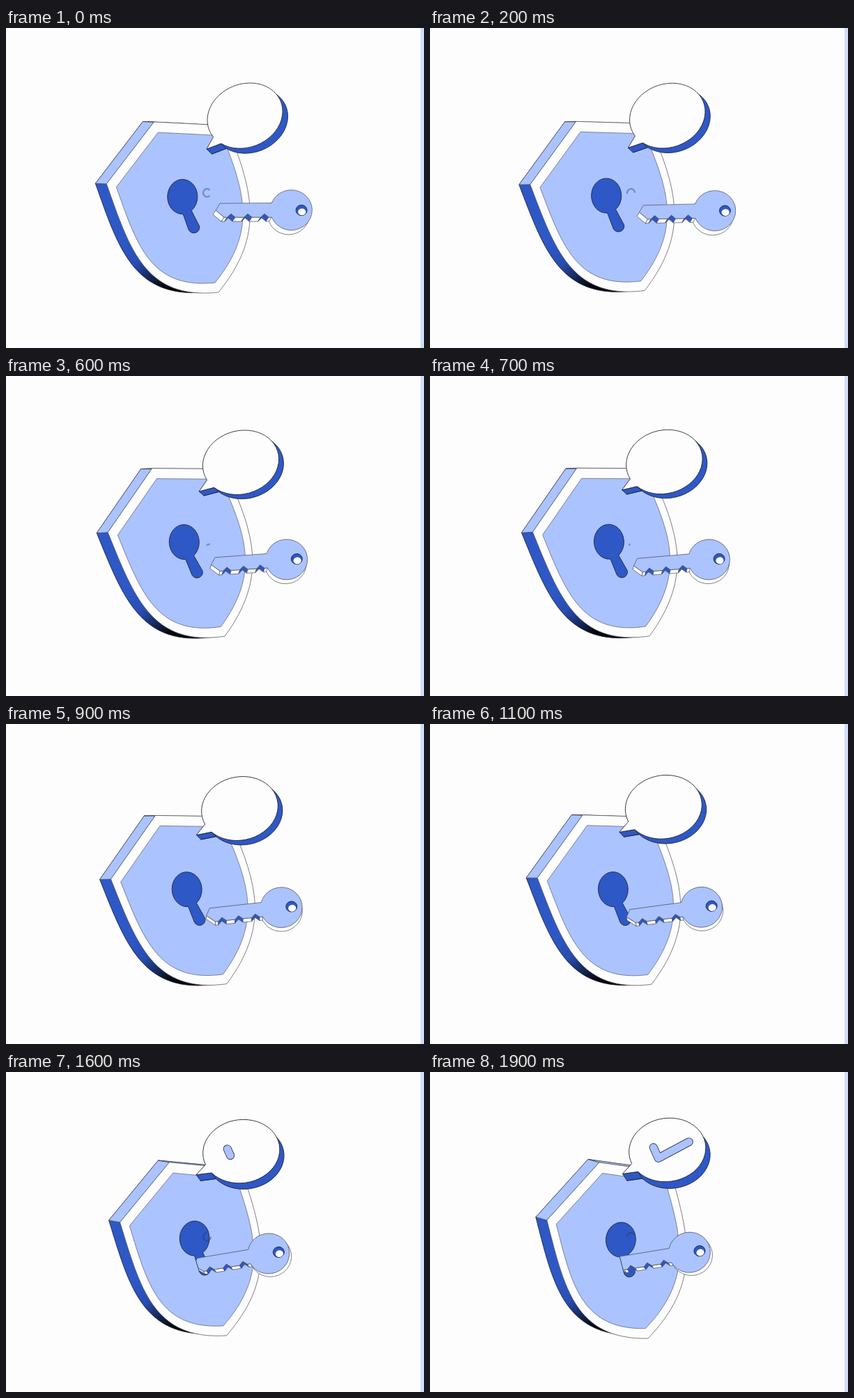
An HTML page that plays this animation: 600x460 px, repeating every 2000 ms.

```html
<!DOCTYPE html>
<html lang="en">
<head>
<meta charset="utf-8">
<title>Shield and key</title>
<style>
  html, body { margin: 0; width: 100%; height: 100%; overflow: hidden; background: #fdfdfd; }
  svg { display: block; width: 600px; height: 460px; }
  .line { stroke: #1b1d26; stroke-width: .8; stroke-linejoin: round; }
  .soft { stroke: #4a4c55; stroke-width: .7; stroke-linejoin: round; }
  .line, .soft { vector-effect: non-scaling-stroke; }
  .light { fill: #abc3ff; }
  .dark { fill: #2e58c6; }
  .white { fill: #fdfdfd; }
  .tick { fill: none; stroke-linecap: round; stroke-linejoin: round; }
</style>
</head>
<body>
<svg viewBox="0 0 600 460">
  <defs>
    <linearGradient id="shade" gradientUnits="userSpaceOnUse" x1="182" y1="314" x2="240" y2="374">
      <stop offset="0" stop-color="#2e58c6"/>
      <stop offset=".4" stop-color="#284db2"/>
      <stop offset="1" stop-color="#05070d"/>
    </linearGradient>
    <path id="plate" d="M212 135L144.5 224C178 318 200 391 305 380C372.5 296 353 233 316 140.3Z"/>
    <path id="balloon" d="M-34.2 40.1A55.3 45.5 -22 1 0 -45.4 30.6L-55 48Z"/>
    <clipPath id="slot"><path id="slotEdge" d="M173.6 40H640V440H315.8Z"/></clipPath>
  </defs>
  <rect width="600" height="460" fill="#fdfdfd"/>
  <rect x="595" width="5" height="460" fill="#cfddfb"/>

  <g id="back"><use href="#plate" fill="url(#shade)" class="line"/></g>
  <path id="bevel" class="light soft"/>
  <g id="front">
    <use href="#plate" class="white soft"/>
    <use href="#plate" class="light soft" transform="translate(31 31) scale(.882)"/>
    <path class="dark line" d="M254 267.5A21.5 25 0 1 1 266 262.5L277.5 285A8.2 8.2 0 0 1 262 290Z"/>
  </g>
  <path id="spinner" fill="none" stroke="#33384f" stroke-opacity=".42" stroke-width="2.2"/>

  <g clip-path="url(#slot)">
    <g id="key">
      <ellipse id="keyBack" rx="30" ry="29" class="white soft"/>
      <g id="teeth"></g>
      <path id="keyFace" class="light soft"/>
      <ellipse cx="14.5" cy="0" rx="8" ry="7.6" class="dark line"/>
      <ellipse cx="15.2" cy="2.4" rx="5.6" ry="4.9" class="white"/>
    </g>
  </g>

  <g id="bubble">
    <g id="bubbleBack"><use href="#balloon" class="dark line"/></g>
    <path id="tail" class="dark line"/>
    <use href="#balloon" class="white line"/>
  </g>
  <g id="check">
    <path class="tick" d="M-20 -3.5L-13 12L31 -11.5" stroke="#1b1d26" stroke-width="12"/>
    <path class="tick" d="M-20 -3.5L-13 12L31 -11.5" stroke="#abc3ff" stroke-width="10.5"/>
  </g>
</svg>
<script>
const LOOP = 2000, STEP = 100, SWAY = 4200;

const $ = id => document.getElementById(id);
const set = (id, name, value) => $(id).setAttribute(name, value);
const poly = pts => 'M' + pts.map(p => p.map(n => n.toFixed(2)).join(' ')).join('L') + 'Z';
const add = ([x, y], [dx, dy]) => [x + dx, y + dy];
const rad = deg => deg * Math.PI / 180;

// Every part floats on one slow cosine; peak is the time of its crest
const swayAt = t => (mid, amp, peak) => mid + amp * Math.cos(2 * Math.PI * (t - peak) / SWAY);

// Matrix that carries the resting top, left and tip points to the current ones
function shieldMatrix(top, left, tip) {
  const ax = -67.5, ay = 89, bx = 93, by = 245, det = ax * by - bx * ay;
  const row = i => {
    const p = left[i] - top[i], q = tip[i] - top[i];
    return [(p * by - q * ay) / det, (q * ax - p * bx) / det];
  };
  const [a, c] = row(0), [b, d] = row(1);
  return [a, b, c, d, top[0] - a * 212 - c * 135, top[1] - b * 212 - d * 135];
}

function drawShield(sway) {
  const top = [sway(229.8, -21, 400), sway(132.7, 2.9, -440)];
  const left = [sway(156.9, -13.1, 190), sway(217.8, 7.4, 380)];
  const tip = [sway(307.5, 10.6, 1210), sway(382.9, -9.4, 840)];
  const off = [-16, sway(-3, 3.9, 590)];
  const m = shieldMatrix(top, left, tip), matrix = `matrix(${m})`;
  const right = [m[0] * 316 + m[2] * 140.3 + m[4], m[1] * 316 + m[3] * 140.3 + m[5]];
  set('front', 'transform', matrix);
  set('slotEdge', 'transform', matrix);
  set('back', 'transform', `translate(${off}) ${matrix}`);
  set('bevel', 'd', poly([left, top, add(top, off), add(left, off)])
    + poly([top, right, add(right, off), add(top, off)]));
}

// Lower edge of the key: blade end, then three notches
const edge = [[-108.5, 0], [-96.5, 10]];
for (let x = -86.5; x < -38; x += 24) edge.push([x - 5.5, 10], [x, 5], [x + 6, 10]);
edge.push([-28.2, 10]);
set('keyFace', 'd', 'M-28.2 -10.5L-102.5 -10L' + edge.map(p => p.join(' ')).join('L')
  + 'A30 29 0 1 0 -28.2 -10.5Z');
const faces = edge.slice(1).map((p, i) => {
  const face = document.createElementNS('http://www.w3.org/2000/svg', 'path');
  face.setAttribute('class', (i > 0 && p[1] !== edge[i][1] ? 'dark' : 'white') + ' soft');
  $('teeth').append(face);
  return face;
});

function drawKey(sway) {
  const at = [sway(390.6, 19, 20), sway(260.2, 3.9, 730)];
  const off = [sway(-1, 3.2, 1870), sway(5.2, .8, -160)];
  set('key', 'transform', `translate(${at}) rotate(${sway(-4.2, 5, -400)})`);
  set('keyBack', 'transform', `translate(${off})`);
  faces.forEach((face, i) => {
    const a = edge[i], b = edge[i + 1];
    face.setAttribute('d', poly([a, b, add(b, off), add(a, off)]));
  });
}

function drawBubble(sway, t) {
  const at = [sway(343, -7.7, 1050), sway(118.6, 7.5, 110)];
  const turn = sway(5.8, 7.8, 1610), c = Math.cos(rad(turn)), s = Math.sin(rad(turn));
  const dx = sway(7, .8, -580), dy = sway(8.8, -2.6, 600);
  const off = [dx * c + dy * s, dy * c - dx * s];
  const tip = [-55, 48], root = [-34.2, 40.1];
  set('bubble', 'transform', `translate(${at}) rotate(${turn})`);
  set('bubbleBack', 'transform', `translate(${off})`);
  set('tail', 'd', poly([tip, root, add(root, off), add(tip, off)]));

  const u = Math.min(Math.max((t - 1500) / 400, 0), 1);
  set('check', 'transform', `translate(${at})`);
  set('check', 'visibility', u > 0 ? 'visible' : 'hidden');
  set('check', 'stroke-dasharray', `${67 * u * u * (3 - 2 * u)} 200`);
}

// A turning arc that shrinks away, then starts again
function drawSpinner(t) {
  const half = 135 * Math.max(0, 1 - 1.9 * (t % 1600) / 1600) ** 1.3;
  const mid = 180 + .42 * t;
  const point = deg => `${288.5 + 5.5 * Math.cos(rad(deg))} ${237 + 5.8 * Math.sin(rad(deg))}`;
  set('spinner', 'd', half < 1 ? '' :
    `M${point(mid - half)}A5.5 5.8 0 ${half > 90 ? 1 : 0} 1 ${point(mid + half)}`);
}

function draw(t) {
  const sway = swayAt(t);
  drawShield(sway);
  drawSpinner(t);
  drawKey(sway);
  drawBubble(sway, t);
}

function tick() {
  draw(Math.floor(performance.now() % LOOP / STEP) * STEP);
  requestAnimationFrame(tick);
}
draw(0);
requestAnimationFrame(tick);
</script>
</body>
</html>
```
